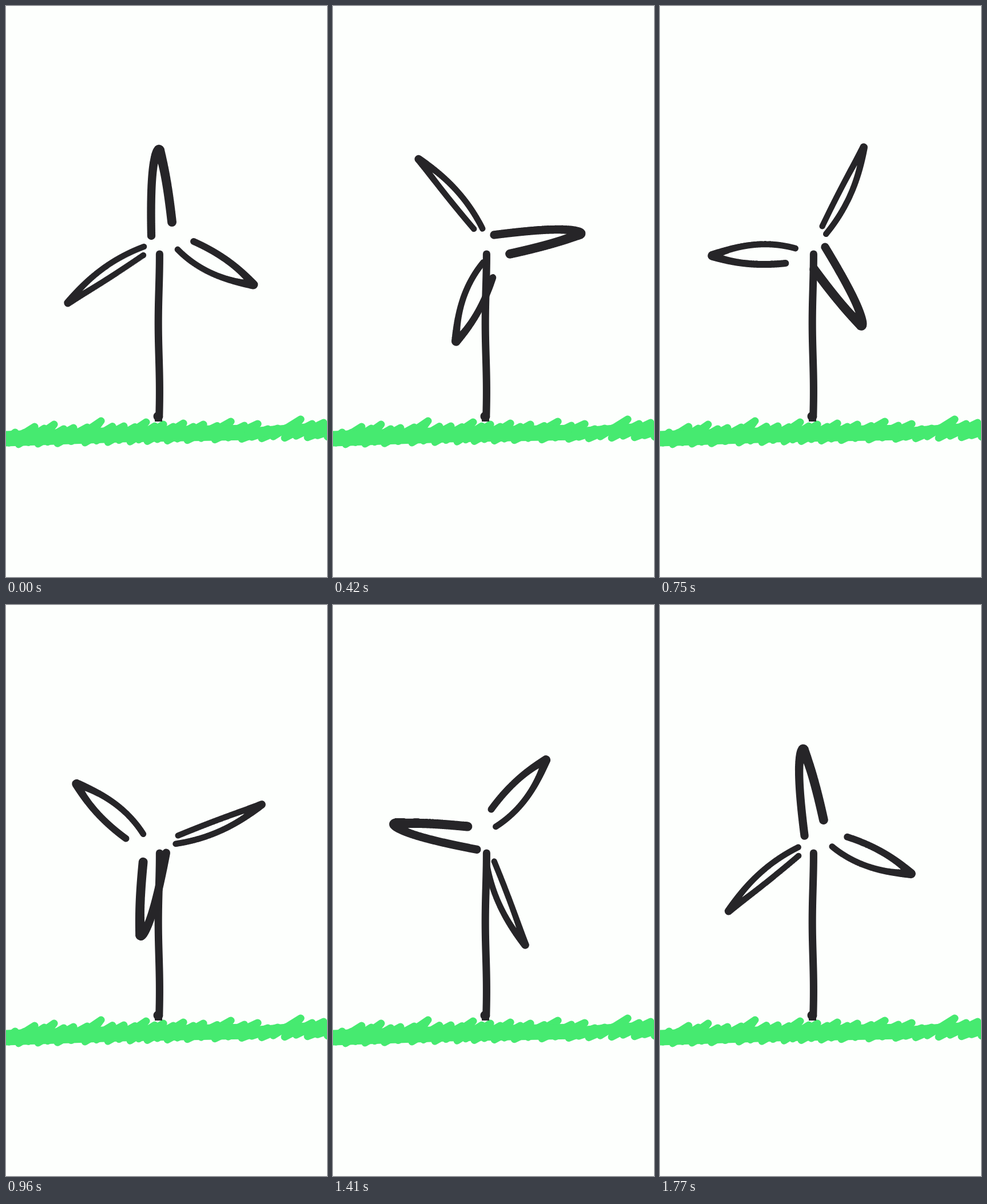
These frames come from a looping animation (561x999 px, 1.8 s). An HTML page with a canvas:

```html
<!DOCTYPE html>
<html lang="en">
<head>
<meta charset="utf-8">
<title>Wind turbine</title>
<style>
html, body { margin: 0; width: 100%; height: 100%; overflow: hidden; background: #fdfffd; }
canvas { display: block; }
</style>
</head>
<body>
<canvas id="stage" width="561" height="999"></canvas>
<script>
const ctx = document.getElementById('stage').getContext('2d');
const INK = '#262528', GRASS = '#46ea70', PAPER = '#fdfffd';
const HUB = { x: 268.6, y: 416.5 };
const LOOP = 1800, STEP = 30;

// Each blade: two curved sides meeting at a rounder tip
const blades = [
  { tip: [267.5, 252], tipR: 9.5, sides: [
    { from: [254, 402], bend: [251, 262], r: 7.2 },
    { from: [290, 378], bend: [280, 289], r: 8 }] },
  { tip: [107.5, 520], tipR: 6.8, sides: [
    { from: [241, 421], bend: [161, 451], r: 5.3 },
    { from: [240, 436], bend: [170, 484], r: 5.2 }] },
  { tip: [433, 488], tipR: 7.8, sides: [
    { from: [328, 412], bend: [395, 442], r: 6 },
    { from: [300, 426], bend: [350, 477], r: 5.4 }] }
];

// Tips of the main upward grass strokes
const peaks = [[16, 746], [50, 736], [84, 732], [118, 738], [166, 726], [206, 735], [245, 728],
  [275, 732], [310, 730], [345, 732], [393, 727], [440, 731], [475, 739], [515, 723], [555, 729], [590, 736]];

function dot(path, x, y, r) {
  path.moveTo(x + r, y);
  path.arc(x, y, r, 0, Math.PI * 2);
}

function bladePath({ tip, tipR, sides }) {
  const path = new Path2D();
  for (const { from, bend, r } of sides) {
    for (let t = 0; t <= 1; t += 0.005) {
      const u = 1 - t;
      const [x, y] = [0, 1].map(i => u * u * from[i] + 2 * u * t * bend[i] + t * t * tip[i]);
      dot(path, x, y, r + (tipR - r) * t ** 6);
    }
  }
  return path;
}

function mastPath() {
  const path = new Path2D();
  for (let y = 434; y < 718; y++) {
    dot(path, 267.3 + 1.1 * Math.cos((y - 434) * Math.PI / 120), y, 6.6);
  }
  dot(path, 266, 718, 8.5);
  path.rect(260, 718, 13, 9);
  return path;
}

// Zigzag: every peak, and a lower one midway, is followed by a stroke down to the left
function grassPath() {
  const path = new Path2D();
  const stroke = (x, y, dip) => {
    path.lineTo(x, y);
    path.lineTo(x - 28, 767 - x * 0.024 + dip);
  };
  peaks.forEach(([x, y], i) => {
    stroke(x, y, 1);
    const next = peaks[i + 1];
    if (next) stroke((x + next[0]) / 2, (y + next[1]) / 2 + 5, -2);
  });
  return path;
}

const rotor = blades.map(bladePath);
const mast = mastPath();
const grass = grassPath();
const thick = new Path2D('M0 757L200 750L425 746');
const thin = new Path2D('M425 747L510 740L580 738');

function line(path, width) {
  ctx.lineWidth = width;
  ctx.stroke(path);
}

function draw(time) {
  const turn = Math.floor((time % LOOP) / STEP) * STEP / LOOP;
  ctx.fillStyle = PAPER;
  ctx.fillRect(0, 0, 561, 999);

  ctx.strokeStyle = GRASS;
  ctx.lineCap = ctx.lineJoin = 'round';
  line(grass, 13);
  line(thick, 27);
  line(thin, 18);

  ctx.fillStyle = INK;
  ctx.fill(mast);
  ctx.save();
  ctx.translate(HUB.x, HUB.y);
  ctx.rotate(turn * Math.PI * 2);
  ctx.translate(-HUB.x, -HUB.y);
  rotor.forEach(p => ctx.fill(p));
  ctx.restore();
}

const start = performance.now();
function tick() {
  draw(performance.now() - start);
  requestAnimationFrame(tick);
}
tick();
</script>
</body>
</html>
```
